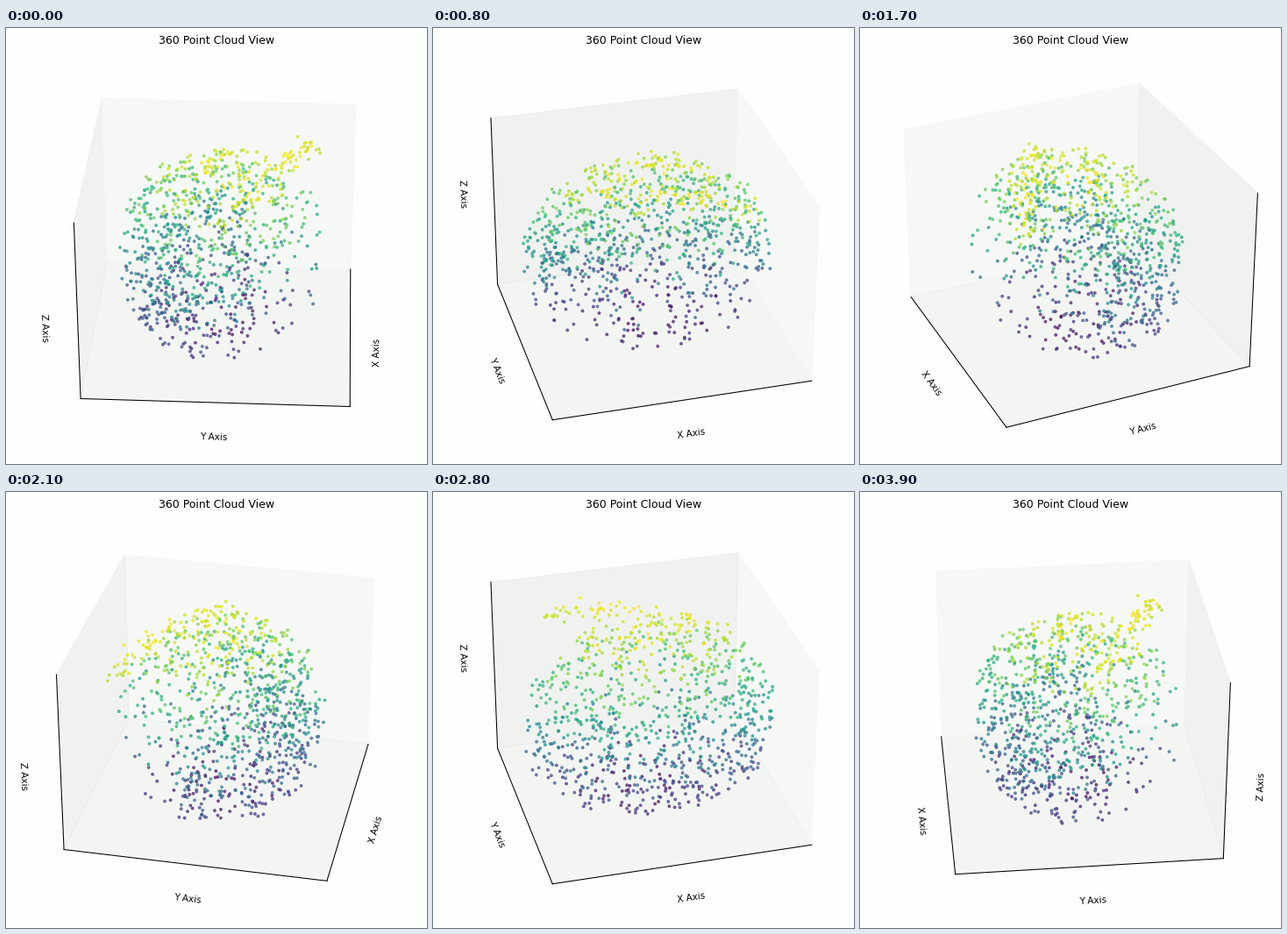
Write a matplotlib script that moves like this. It is 480x497 px and loops after 4000 ms.

```python
import numpy as np
import matplotlib.pyplot as plt
from matplotlib.animation import FuncAnimation

W, H, DPI = 480, 497, 75
FRAMES, INTERVAL = 40, 100
BACKGROUND = "#fcfffc"
HALF_XY, HALF_Z = 0.5953, 0.4465
rng = np.random.default_rng(7)


def blob_points(count):
    """Dome with a boxy lower half, thinly covered on its +y side."""
    n = count * 8
    t = rng.uniform(-1, 1, n)
    angle = rng.uniform(0, 2 * np.pi, n)
    power = np.where(t > 0, 2.3, 3.5)
    rho = (1 - np.abs(t) ** power) ** 0.45 * rng.uniform(0.03, 1, n) ** 0.38
    x, y, z = 0.58 * rho * np.cos(angle), 0.47 * rho * np.sin(angle), 0.41 * t

    keep = 1 - 0.6 * t**2
    keep[y > 0.15] *= 0.6
    keep[(y > 0.12) & (t > -0.65) & (t < 0.2)] *= 0.3
    keep[(x > 0.2) & (y > -0.1) & (t < -0.2)] *= 0.5
    keep[(x > 0.25) & (y < 0) & (t > 0.3)] *= 0.5
    chosen = np.flatnonzero(rng.uniform(0, 1, n) < keep)[:count]
    return np.column_stack([x, y, z])[chosen]


def ridge_points(count):
    """Narrow crest that crosses the top of the cloud."""
    s = rng.uniform(0, 1, count)
    x = -0.38 + 0.76 * s
    y = 0.39 - 0.36 * s + 0.03 * np.sin(np.pi * s)
    z = 0.345 + 0.05 * np.sin(np.pi * s)
    return np.column_stack([x, y, z]) + rng.normal(0, 0.03, (count, 3)) * [1, 1, 0.6]


points = np.vstack([blob_points(930), ridge_points(60)])
points[:, 2] = np.clip(points[:, 2], -0.4286, 0.4286)

fig = plt.figure(figsize=(W / DPI, H / DPI), dpi=DPI, facecolor=BACKGROUND)
ax = fig.add_axes([8 / W, 8.4 / H, 464 / W, 464 / H], projection="3d")
ax.set_facecolor(BACKGROUND)
ax.scatter(*points.T, c=points[:, 2], cmap="viridis", s=7.5, alpha=0.65,
           vmin=-0.4286, vmax=0.42)
ax.set(xlim=(-HALF_XY, HALF_XY), ylim=(-HALF_XY, HALF_XY), zlim=(-HALF_Z, HALF_Z),
       xticks=[], yticks=[], zticks=[],
       xlabel="X Axis", ylabel="Y Axis", zlabel="Z Axis")
ax.set_title("360 Point Cloud View", pad=6.6)
ax.grid(False)
for axis in (ax.xaxis, ax.yaxis, ax.zaxis):
    axis.line.set_linewidth(1)


def update(i):
    ax.view_init(elev=30, azim=3 + 360 * i / FRAMES)
    return []


anim = FuncAnimation(fig, update, frames=FRAMES, interval=INTERVAL,
                     init_func=lambda: update(0), repeat=True, repeat_delay=0)
plt.show()
```
